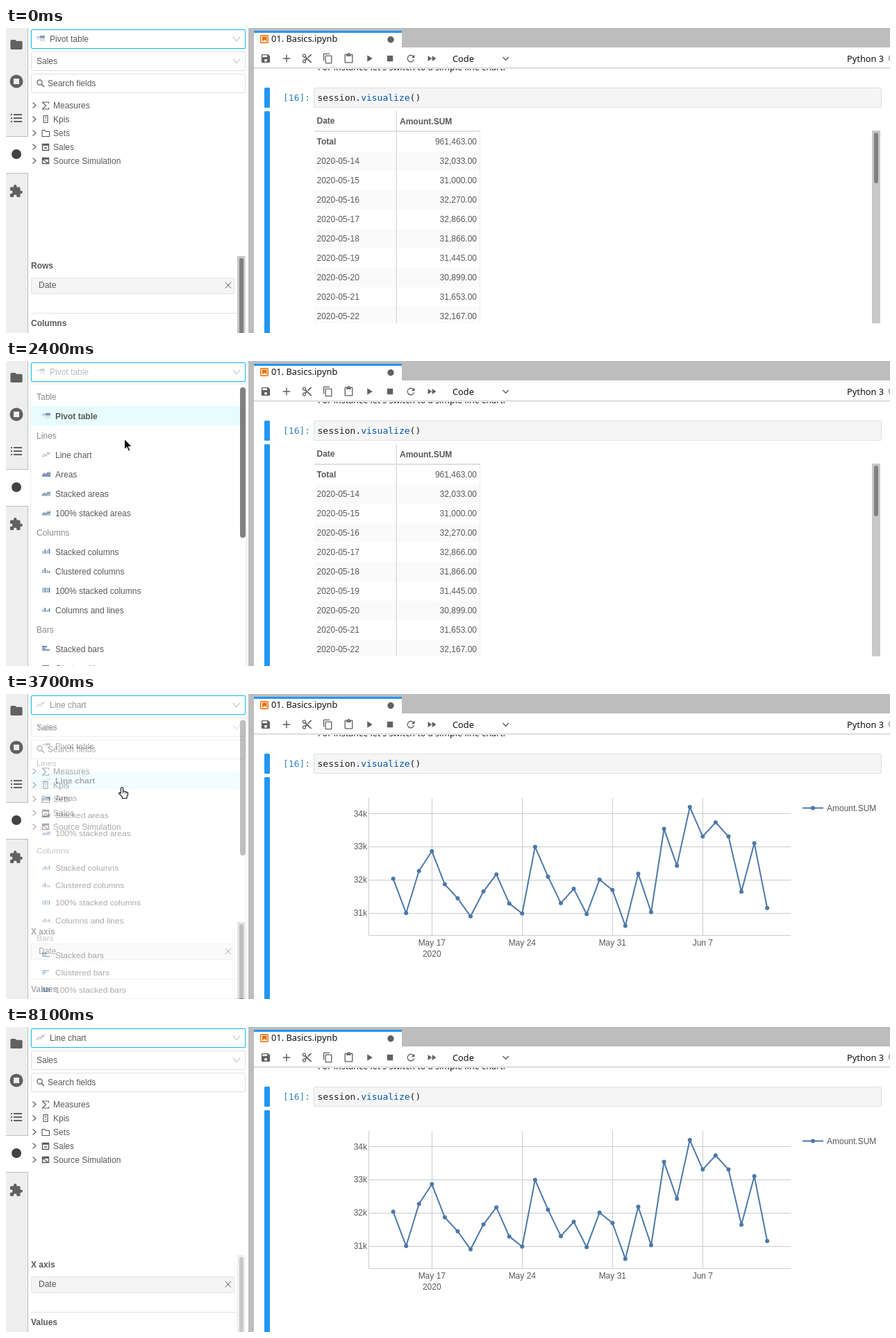
These frames come from a looping animation (1273x440 px, 8.2 s). An HTML page:

```html
<!DOCTYPE html>
<html lang="en">
<head>
<meta charset="utf-8">
<title>Switching a pivot table to a line chart</title>
<style>
html, body { margin: 0; width: 100%; height: 100%; overflow: hidden; background: #fff; }
svg { display: block; }
text { font: 12px "Liberation Sans", Arial, sans-serif; fill: #595959; white-space: pre; }
.b { font-weight: bold; }
.ui { font: 12.8px "Noto Sans", sans-serif; fill: #111; }
.code { font: 13px "DejaVu Sans Mono", monospace; fill: #212121; }
.group { fill: #8c8c8c; }
.end { text-anchor: end; }
.mid { text-anchor: middle; }
</style>
</head>
<body>
<svg id="stage" width="1273" height="440" viewBox="0 0 1273 440"></svg>
<script>
const LOOP = 8200;
const INK = "#616161", BLUE = "#4c78a8";

const rect = (x, y, w, h, fill, more = "") =>
  `<rect x="${x}" y="${y}" width="${w}" height="${h}" fill="${fill}" ${more}/>`;
const text = (x, y, s, cls = "", more = "") => `<text x="${x}" y="${y}" class="${cls}" ${more}>${s}</text>`;
const line = (d, color, w = 1, more = "") =>
  `<path d="${d}" fill="none" stroke="${color}" stroke-width="${w}" ${more}/>`;
const group = (id, body, more = "") => `<g id="${id}" ${more}>${body}</g>`;
const box = (x, y, w, h, border, fill = "#fff") =>
  rect(x + .5, y + .5, w - 1, h - 1, fill, `rx="1.5" stroke="${border}"`);
// Icon drawn in a 24 unit square, centred on cx, cy
const icon = (cx, cy, k, d) =>
  `<path d="${d}" fill="${INK}" fill-rule="evenodd" transform="translate(${cx} ${cy}) scale(${k}) translate(-12 -12)"/>`;
const chevron = (x, y) => line(`M${x - 5} ${y - 3.5}l5 6.5 5-6.5`, "#b0b0b0");

function sidebar() {
  let s = rect(0, 0, 32, 440, "#eee") + rect(31, 0, 1, 440, "#bdbdbd")
    + rect(0, 156, 32, 54, "#bdbdbd") + rect(0, 157, 32, 52, "#fff");
  s += icon(15, 24, .86, "M10 4H4c-1.1 0-2 .9-2 2v12c0 1.1.9 2 2 2h16c1.1 0 2-.9 2-2V8c0-1.1-.9-2-2-2h-8z");
  s += `<circle cx="15" cy="77" r="9.5" fill="${INK}"/>` + rect(11, 73, 8, 8, "#eee");
  for (const y of [124, 129, 134]) s += rect(7, y, 2, 2, INK) + rect(11, y, 12, 2, INK);
  s += `<circle cx="15" cy="182" r="7" fill="#424242"/>`;
  s += icon(14.5, 235.5, .86, "M20.5 11H19V7c0-1.1-.9-2-2-2h-4V3.5a2.5 2.5 0 0 0-5 0V5H4c-1.1 0-2 .9-2 2v3.8h1.5a2.7 2.7 0 0 1 0 5.4H2V20c0 1.1.9 2 2 2h3.8v-1.5a2.7 2.7 0 0 1 5.4 0V22H17c1.1 0 2-.9 2-2v-4h1.5a2.5 2.5 0 0 0 0-5z");
  return s;
}

function tree() {
  const icons = [
    "M61.5 109v-2h-9l5 5-5 5h9v-2",
    "M54 126.500h6v10h-6zM57 128v3M57 133v1.500",
    "M52 147.500h4l1.500 2h5v7h-10.500z",
    "M52.500 167.500h9v9h-9zM52.500 169h9M55 173h4",
    "M52.500 187.500h9v8h-9zM52.500 189h9M53 189.500l8 6"
  ];
  return ["Measures", "Kpis", "Sets", "Sales", "Source Simulation"].map((name, i) => {
    const y = 112 + 20 * i;
    return line(`M38.500 ${y - 4.500}l4.500 4-4.500 4`, "#595959", 1.1)
      + line(icons[i], "#595959", i > 2 ? 1.4 : 1.1) + text(68, y + 4, name);
  }).join("");
}

function panel() {
  return rect(32, 0, 317, 440, "#fff")
    + rect(35, 1, 311, 30, "#d9f5fd", 'rx="2"') + box(36, 2, 309, 28, "#1fbdec") + chevron(332, 16)
    + group("picked", "")
    + box(36, 34, 309, 28, "#e0e0e0") + text(44, 52, "Sales") + chevron(332, 48)
    + box(36, 66, 309, 28, "#e0e0e0") + text(60, 84, "Search fields")
    + `<circle cx="48.500" cy="78.500" r="3.600" fill="none" stroke="#595959" stroke-width="1.200"/>`
    + line("M51 81l4 4", "#595959", 1.4) + tree()
    + text(36, 347, "", "b", 'id="axisA"')
    + box(36, 360, 293, 24, "#e4e4e4", "#f5f5f5") + text(47, 375, "Date")
    + line("M316 367l8 8.500M324 367l-8 8.500", "#595959")
    + rect(36, 411, 297, 1, "#e4e4e4")
    + text(36, 430, "", "b", 'id="axisB"')
    + rect(333, 329, 11.500, 111, "", 'id="track"') + rect(336, 332, 6, 120, "", 'id="thumb" rx="3"');
}

function notebook() {
  let s = rect(349, 0, 924, 440, "#bdbdbd") + rect(357, 28, 916, 412, "#fff")
    + rect(357, 4, 213, 25, "#fff") + rect(357, 4, 213, 3, "#2196f3");
  s += rect(366.700, 10.700, 10.600, 10.600, "#fff", 'rx="1" stroke="#ef6c00" stroke-width="1.400"')
    + `<path d="M369 12.500h6.500v7l-3.250-2.500-3.250 2.500z" fill="#ef6c00"/>`;
  s += text(382, 19.500, "01. Basics.ipynb", "ui") + `<circle cx="554" cy="16.700" r="4.700" fill="${INK}"/>`;
  s += text(449, 61, "For instance let's switch to a simple line chart.", "ui", 'style="font-size:12.600px"');
  s += rect(357, 29, 916, 28, "#fff") + rect(357, 57, 916, 1, "#d0d0d0") + rect(357, 58, 916, 1, "#ececec");
  const tools = [
    [374, .68, "M17 3H5c-1.110 0-2 .9-2 2v14c0 1.100.89 2 2 2h14c1.100 0 2-.9 2-2V7zM12 19a3 3 0 1 1 0-6 3 3 0 0 1 0 6zM15 9H5V5h10z"],
    [404, .76, "M19 13h-6v6h-2v-6H5v-2h6V5h2v6h6z"],
    [433.500, .68, "M9.640 7.640A4 4 0 1 0 7.640 9.640L10 12l-2.360 2.360A4 4 0 1 0 9.640 16.360L12 14l7 7h3v-1zM6 8a2 2 0 1 1 0-4 2 2 0 0 1 0 4zM6 20a2 2 0 1 1 0-4 2 2 0 0 1 0 4zM19 3l-6 6 2 2 7-7V3z"],
    [463.500, .66, "M16 1H4c-1.100 0-2 .9-2 2v14h2V3h12zM19 5H8c-1.100 0-2 .9-2 2v14c0 1.100.9 2 2 2h11c1.100 0 2-.9 2-2V7c0-1.100-.9-2-2-2zM19 21H8V7h11z"],
    [493.500, .66, "M19 2h-4.180a3 3 0 0 0-5.640 0H5c-1.100 0-2 .9-2 2v16c0 1.100.9 2 2 2h14c1.100 0 2-.9 2-2V4c0-1.100-.9-2-2-2zM12 2a1 1 0 1 1 0 2 1 1 0 0 1 0-2zM19 20H5V4h2v3h10V4h2z"],
    [523, .68, "M8 5v14l11-7z"],
    [553, .7, "M6 6h12v12H6z"],
    [583, .68, "M17.650 6.350A8 8 0 1 0 19.730 14h-2.080A6 6 0 1 1 12 6c1.660 0 3.140.69 4.220 1.780L13 11h7V4z"],
    [613, .68, "M4 18l8.500-6L4 6zM13 6v12l8.500-6z"]
  ];
  s += tools.map(([x, k, d]) => icon(x, 44, k, d)).join("");
  s += text(643, 48.500, "Code", "ui") + line("M715.500 42l4.200 4.200 4.200-4.200", INK, 1.5);
  s += text(1211, 49, "Python 3", "ui")
    + `<circle cx="1277" cy="43.500" r="5.500" fill="none" stroke="${INK}"/>`;
  s += rect(372, 86, 8, 29, "#2196f3", 'rx="1.500"') + rect(372, 120, 8, 325, "#2196f3", 'rx="1.500"')
    + box(443, 86, 818, 29, "#e0e0e0", "#f5f5f5")
    + text(399, 105, "[16]:", "code", 'style="fill:#307fc1"')
    + text(448.500, 105, 'session.<tspan fill="#05a">visualize</tspan>()', "code");
  return s;
}

const sales = [32033, 31000, 32270, 32866, 31866, 31445, 30899, 31653, 32167, 31290,
  30985, 33000, 32100, 31300, 31730, 30970, 32010, 31695, 30615, 32185,
  31025, 33540, 32430, 34200, 33310, 33735, 33310, 31645, 33110, 31150];

function table() {
  const money = n => n.toLocaleString("en-US") + ".00";
  let s = "";
  for (let i = 0; i < 10; i++) {
    const y = 150 + 28 * i, n = i ? sales[i - 1] : 961463;
    if (i % 2) s += rect(444, y + 28 * 0, 239, i < 9 ? 28 : 24, "#fafafa");
    s += text(447.500, y + 17.500 + (i > 0) * .5, i ? "2020-05-" + (13 + i) : "Total", i ? "" : "b") + text(678, y + 17.500, money(n), "end");
  }
  return s + text(447.500, 138, "Date", "b") + text(567, 138.500, "Amount.SUM", "b")
    + rect(444, 148, 239, 2, "#e0e0e0") + rect(561.500, 120, 1.500, 306, "#dcdcdc") + rect(682, 150, 1, 276, "#ececec")
    + rect(1247, 148, 12, 278, "#c8c8c8") + rect(1250, 151, 6, 73, "#808080", 'rx="3"');
}

function chart() {
  const px = i => 557.600 + i * 130 / 7;
  const py = v => 316 - (v - 31000) * .0478;
  let s = "";
  for (let k = 31; k <= 34; k++) {
    const y = py(k * 1000);
    s += line(`M523 ${Math.floor(y) + .5}H1130.500`, "#ccc") + text(520, y + 4, k + "k", "end");
  }
  ["May 17", "May 24", "May 31", "Jun 7"].forEach((name, i) => {
    const x = px(3 + 7 * i);
    s += line(`M${Math.floor(x) + .5} 150V348`, "#ccc") + text(x, 363, name, "mid");
  });
  s += text(613.300, 379, "2020", "mid") + line("M522.500 150V348.500H1130.500", "#ccc");
  const dot = (x, y) => `<circle cx="${x}" cy="${y}" r="3" fill="${BLUE}"/>`;
  s += line("M" + sales.map((v, i) => px(i) + " " + py(v)).join("L"), BLUE, 2, 'stroke-linejoin="round"')
    + sales.map((v, i) => dot(px(i), py(v))).join("");
  return s + line("M1147 164.500H1177", BLUE, 2) + dot(1162, 164.500) + text(1182, 168.500, "Amount.SUM");
}

// Small chart symbols, 12 by 10
const bars = (sizes, flat) => sizes.map((n, i) =>
  flat ? rect(0, 1 + i * 2.500, n, 1.600, BLUE) : rect(.5 + i * 3, 8 - n, 1.700, n, i % 2 ? BLUE : "#8fa8c6")).join("");
const area = c => `<path d="M0 9V6l3-3 2 2 3-3 2 1 2-2v8z" fill="${c}"/>`;
const symbols = {
  pivot: rect(0, 2, 5, 2.500, "#b9c7da") + rect(5, 1, 7, 3.500, "#7f97b6") + rect(5, 5, 7, 4, "#dde3ea") + rect(1, 5, 3, 2, "#dfe5ec"),
  line: line("M0 8l3-4 2 3 3-5 1 2 3-3", "#9aa7b6") + line("M0 9l4-2 3 0 4-4", "#c3cad2"),
  area: area("#7f97b6"),
  areas: area("#b5c0ce") + line("M0 8l3-2 2 1 3-2 4-1", BLUE),
  stack: bars([4, 6, 5, 7]), cluster: bars([5, 7, 4, 3]), full: bars([7, 7, 7, 7]), mix: bars([4, 6, 3, 5]),
  flat: bars([7, 5, 11], 1), flats: bars([10, 6, 4], 1), flatFull: bars([11, 11, 11], 1)
};
const symbol = (name, x, y) => `<g transform="translate(${x} ${y})">${symbols[name]}</g>`;

const menu = [["Table"], ["Pivot table", "pivot"], ["Lines"], ["Line chart", "line"], ["Areas", "area"],
  ["Stacked areas", "areas"], ["100% stacked areas", "areas"], ["Columns"], ["Stacked columns", "stack"],
  ["Clustered columns", "cluster"], ["100% stacked columns", "full"], ["Columns and lines", "mix"], ["Bars"],
  ["Stacked bars", "flat"], ["Clustered bars", "flats"], ["100% stacked bars", "flatFull"]];

function dropdown(selected) {
  const rows = menu.map(([name, sym], i) => {
    const y = 51 + 28 * i;
    if (!sym) return text(44, y + 4.500, name, "group");
    const on = name === selected;
    return (on ? rect(36, y - 14, 309, 28, "#e6fcff") : "")
      + symbol(sym, 52, y - 5) + text(71, y + 4.500, name, on ? "b" : "");
  });
  return rect(36, 34, 309, 450, "#fff", 'rx="2" style="filter:drop-shadow(0 2px 4px rgba(0,0,0,.15))"')
    + rows.join("") + rect(337, 38, 8, 217, "#808080", 'rx="4"');
}

const pointers = {
  arrow: `<path d="M0 0V15l3.400-3.200 2.500 5.700 2.400-1-2.400-5.500h4.800z" fill="#111" stroke="#fff"/>`,
  hand: `<path d="M3 1.500Q4.500-.5 6 1.500V6.500L7.500 6 9 7l1.500-.2 1 1 1.500.2V11.500L11.500 14.500V16.500H5V14.500L0 9.500Q0 7.500 2 8.300L3 9.300Z" fill="#fff" stroke="#222" stroke-width="1.200" stroke-linejoin="round"/>`
    + line("M6 6.500V9.500M8.700 7.500V9.500M11 8V9.500", "#222", .9)
};

// [from, pointer, x, y]
const moves = [[0], [1000, "arrow", 200, -7], [1100, "hand", 195, 5], [1200, "hand", 196, 13], [1300, "hand", 195, 15.500],
  [2200, "arrow", 191, 46], [2300, "hand", 177, 78], [2400, "arrow", 170.500, 112.500], [2600, "hand", 162.500, 134],
  [3900]];
// [from, openness]
const opening = [[0, 0], [1500, .02], [1600, .2], [1700, .72], [1800, .95], [1900, 1],
  [3500, .99], [3600, .9], [3700, .5], [3800, .1], [3900, 0]];
// [from, strength of the chosen label]
const labels = [[0, 1], [1500, .85], [1600, .65], [1700, .5], [1800, .4], [3600, .45], [3700, .65], [3800, .85], [3900, 1]];

const at = (keys, t) => keys.findLast(k => k[0] <= t);

const stage = document.getElementById("stage");
stage.innerHTML = `<defs><clipPath id="clip"><path d="M35 30H347V440H35z"/></clipPath></defs>`
  + sidebar() + notebook() + panel() + group("table", table()) + group("chart", chart())
  + `<g clip-path="url(#clip)">` + group("menuPivot", dropdown("Pivot table")) + group("menuLine", dropdown("Line chart")) + "</g>"
  + group("pointer", "");

const part = id => document.getElementById(id);
const show = (id, on) => part(id).setAttribute("display", on ? "inline" : "none");

function render(time) {
  const t = Math.floor(time % LOOP / 100) * 100;
  const charted = t >= 3500, idle = t >= 8000;
  show("table", !charted);
  show("chart", charted);
  part("axisA").textContent = charted ? "X axis" : "Rows";
  part("axisB").textContent = charted ? "Values" : "Columns";
  part("track").setAttribute("fill", idle ? "#efefef" : "#c8c8c8");
  part("thumb").setAttribute("fill", idle ? "#c9c9c9" : "#808080");

  part("picked").innerHTML = symbol(charted ? "line" : "pivot", 44, 10) + text(63, 20, charted ? "Line chart" : "Pivot table");
  part("picked").setAttribute("opacity", at(labels, t)[1]);

  const open = at(opening, t)[1];
  for (const [id, on] of [["menuPivot", !charted], ["menuLine", charted]]) {
    show(id, on && open > 0);
    part(id).setAttribute("opacity", open);
    part(id).setAttribute("transform", `translate(0 34) scale(1 ${.8 + .2 * open}) translate(0 -34)`);
  }

  const [, kind, x, y] = at(moves, t);
  part("pointer").innerHTML = kind ? pointers[kind] : "";
  if (kind) part("pointer").setAttribute("transform", `translate(${x} ${y})`);
}

const start = performance.now();
function tick() {
  render(performance.now() - start);
  requestAnimationFrame(tick);
}
tick();
</script>
</body>
</html>
```
